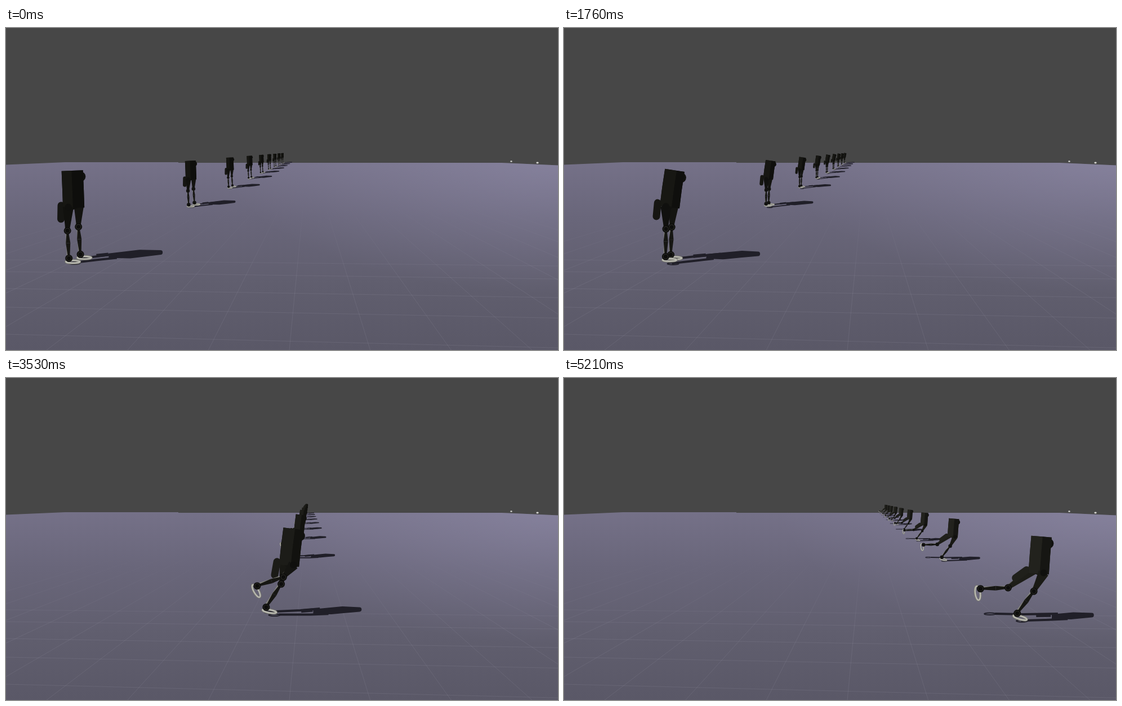
Write an HTML page with a canvas that moves like this. It is 980 px wide and 571 px high and loops after 5.28 s.

```html
<!DOCTYPE html>
<html lang="en">
<head>
<meta charset="utf-8">
<title>Walking robots</title>
<style>
html, body { margin: 0; width: 100%; height: 100%; overflow: hidden; background: #474747; }
canvas { display: block; }
</style>
</head>
<body>
<canvas id="stage" width="980" height="571"></canvas>
<script>
const ctx = document.getElementById('stage').getContext('2d');
const W = 980, H = 571, LOOP = 5280, HOLD = 680, STEP = 76.78, ROBOTS = 9, SHIN = 49;
const VP = [537, 218];

const lerp = (a, b, u) => a + (b - a) * u;
const rad = deg => deg * Math.PI / 180;
const sin = deg => Math.sin(rad(deg));
const cos = deg => Math.cos(rad(deg));
const mix = (a, b, u) => a.map((v, i) => lerp(v, b[i], u));

// Pose: step, hip x, hip y, lean, then near and far leg as
// thigh angle, thigh length as seen, shin angle. Angles in degrees, forward positive.
const stand = [0, 120, 314, -2, -2, 42, 3, -1, 42, 4];
const kick = [9, 152, 346, -92, 110, 45, 102, 9, 19, -40];
const lean = [21, 279, 306, 62, 13, 28, -23, -32, 55, -37];
const reach = [31, 388, 331, 35, 19, 25, -10, -47, 18, -51];
const push = [45, 618, 325, -23, -39, 58, -56, -32, 38, -92];
const glide = [56, 775, 324, 27, -15, 35, -39, -36, 43, -66];
const land = [60, 843, 342, 4, -28, 37, -37, -54, 57, -88];

const upright = stand.slice();
upright[0] = 14;
upright[1] += 53;

// Half a stride on, the legs have traded places.
function stride(a, b) {
  const m = mix(a, b, .5);
  return [...m.slice(0, 4), ...m.slice(7), ...m.slice(4, 7)];
}

const poses = [stand, kick, upright, lean, stride(lean, reach), reach,
  stride(reach, push), push, stride(push, glide), glide, land];

function poseAt(step) {
  const i = Math.max(1, poses.findIndex(p => p[0] >= step));
  const a = poses[i - 1], b = poses[i];
  return mix(a, b, (step - a[0]) / (b[0] - a[0]));
}

const move = ([x, y], deg, d) => [x + d * sin(deg), y - d * cos(deg)];
const hang = ([x, y], deg, d) => [x + d * sin(deg), y + d * cos(deg)];

function makeLeg(hip, thigh, length, shin) {
  const knee = hang(hip, thigh, length), ankle = hang(knee, shin, SHIN);
  // The foot stays flat until the shin swings far enough.
  const tilt = -Math.sign(shin) * Math.max(0, Math.abs(shin) - 25) * 1.3;
  const sole = [ankle[0] + 7 * cos(tilt) - 6 * sin(tilt), ankle[1] + 7 * sin(tilt) + 6 * cos(tilt)];
  return { hip, knee, ankle, sole, tilt };
}

function build([, x, y, tilt, ...legs]) {
  const spread = 11 * Math.cos(x / 220), hips = [x, y];
  const bent = tilt + 12 * sin(tilt), turn = sin(2 * tilt);
  const half = 19 - 6 * Math.max(0, turn);
  const base = move(hips, tilt, -5), mid = move(hips, tilt, 28), top = move(mid, bent, 33);
  // A column of the torso: -half is the back, half is the chest.
  const side = d => [move(base, tilt + 90, d), move(mid, (tilt + bent) / 2 + 90, d), move(top, bent + 90, d)];
  const back = side(-half), chest = side(half), edge = side(half * turn * .85);
  const pad = move(hips, tilt - 90, 22);
  return {
    x, back, chest, edge, bent,
    body: [...back, ...chest.slice().reverse()],
    near: makeLeg([x - spread, y + 3.5], ...legs.slice(0, 3)),
    far: makeLeg([x + spread, y - 3.5], ...legs.slice(3)),
    pad: [pad, hang(pad, legs[3], 24)],
    lens: move(move(mid, bent, 22), bent + 90, half * .75),
    glow: Math.max(0, -sin(tilt))
  };
}

function path(points) {
  ctx.beginPath();
  points.forEach(p => ctx.lineTo(...p));
}

function poly(points, fill) {
  path(points);
  ctx.fillStyle = fill;
  ctx.fill();
}

function line(points, width, color) {
  path(points);
  ctx.lineWidth = width;
  ctx.strokeStyle = color;
  ctx.stroke();
}

function oval([x, y], rx, ry, deg, fill, stroke, width) {
  ctx.beginPath();
  ctx.ellipse(x, y, rx, ry, rad(deg), 0, 7);
  if (fill) { ctx.fillStyle = fill; ctx.fill(); }
  if (stroke) { ctx.lineWidth = width; ctx.strokeStyle = stroke; ctx.stroke(); }
}

// Taper from p to q.
function limb(p, q, w1, w2, color) {
  const d = Math.hypot(q[0] - p[0], q[1] - p[1]) || 1;
  const nx = (p[1] - q[1]) / d / 2, ny = (q[0] - p[0]) / d / 2;
  const at = ([x, y], w) => [x + nx * w, y + ny * w];
  poly([at(p, w1), at(q, w2), at(q, -w2), at(p, -w1)], color);
}

function drawLeg({ hip, knee, ankle, sole, tilt }, shade) {
  const ry = 2.6 + 2.2 * Math.abs(sin(tilt));
  oval(sole, 12.5, ry, tilt, null, '#77776f', 4);
  oval(sole, 12.5, ry - .3, tilt, null, '#b9b9b1', 2.4);
  const lit = ([x, y]) => [x - 2, y - 2];
  line([hip, knee].map(lit), 5, '#5c5c56');
  limb(hip, knee, 19, 7, shade);
  line([knee, ankle].map(lit), 3, '#85857d');
  const calf = mix(knee, ankle, .45);
  limb(knee, calf, 3, 8, '#161613');
  limb(calf, ankle, 8, 3, '#161613');
  for (const p of [knee, ankle]) {
    oval(p, 6.5, 6.5, 0, '#0d0d0c');
    oval(p, 4.2, 4.2, 0, null, '#282823', 1.2);
  }
}

function drawShadow({ near, far, body, pad }) {
  const color = '#201f28';
  const cast = lift => ([x, y]) => {
    const ground = 411 + .02 * x + lift, h = Math.max(0, ground - y);
    return [x + (.92 - x / 2000) * h, ground - (.105 - x * .00006) * h];
  };
  for (const [leg, lift] of [[near, 4], [far, -5]]) {
    const flat = cast(lift);
    line([leg.hip, leg.knee, leg.ankle].map(flat), 4, color);
    oval(flat(leg.sole), 10, 1.8, 0, null, color, 2);
  }
  const flat = body.map(cast(0));
  poly(flat, color);
  line([...flat, flat[0]], 8, color);
  line(pad.map(cast(-2)), 6, color);
}

function drawRobot(r) {
  const tone = k => {
    const v = (20 + r.x / 60) * k;
    return `rgb(${v},${v},${v * .84})`;
  };
  drawShadow(r);
  drawLeg(r.far, tone(.85));
  ctx.lineCap = 'round';
  line(r.pad, 13, tone(.95));
  line([r.near.hip, r.far.hip], 15, tone(.7));
  ctx.lineCap = 'butt';
  oval(r.lens, 9, 9, 0, '#11110f');
  poly(r.body, tone(.85));
  poly([...r.back, ...r.edge.slice().reverse()], tone(1));
  poly([...r.edge, ...r.chest.slice().reverse()], tone(.65));
  drawLeg(r.near, tone(.75));
  oval(r.near.hip, 6, 6, 0, '#10100e');
  if (r.glow > .1) {
    oval(r.lens, 11, 8, -9, '#080909', `rgba(80,85,82,${r.glow * .7})`, 1.2);
    oval(r.lens, 7, 4.5, -9, `rgba(65,165,215,${r.glow})`);
  }
}

function drawScene() {
  ctx.fillStyle = '#474747';
  ctx.fillRect(0, 0, W, H);
  const floor = ctx.createLinearGradient(0, 237, 0, H);
  floor.addColorStop(0, '#757188');
  floor.addColorStop(.3, '#69667a');
  floor.addColorStop(.65, '#605e6e');
  floor.addColorStop(1, '#5a5867');
  poly([[0, 242.5], [105, 238], [306, 238], [306, 239], [880, 239], [W, 243.5], [W, H], [0, H]], floor);

  const light = ctx.createRadialGradient(1000, 225, 0, 1000, 225, 620);
  light.addColorStop(0, 'rgba(165,160,195,.36)');
  light.addColorStop(1, 'rgba(165,160,195,0)');
  ctx.save();
  ctx.clip();
  ctx.transform(1, 0, 0, .4, 0, 135);
  ctx.fillStyle = light;
  ctx.fillRect(0, 240, W, 900);
  ctx.restore();

  const grid = ctx.createLinearGradient(0, 310, 0, 450);
  grid.addColorStop(0, 'rgba(165,163,180,0)');
  grid.addColorStop(1, 'rgba(165,163,180,.15)');
  for (let i = -8; i <= 8; i++) line([VP, [503 + i * 143.6, H]], 1, grid);
  for (const y of [411, 432, 462, 495, 543])
    line([[0, y], [W, y + 11 + (y - 411) * .1]], 1, grid);
  oval([897, 236.5], 1.7, 1.3, 0, '#d5d5d0');
  oval([943.5, 239], 2.2, 1.4, 0, '#d5d5d0');
}

function frame(now) {
  const t = now % LOOP;
  const step = t < HOLD ? 0 : Math.min(60, Math.floor((t - HOLD) / STEP + .1) + 1);
  const robot = build(poseAt(step));
  ctx.lineJoin = 'round';
  drawScene();
  // Robot k stands k times as far away as the first.
  for (let k = ROBOTS; k > 0; k--) {
    ctx.setTransform(1 / k, 0, 0, 1 / k, VP[0] * (1 - 1 / k), VP[1] * (1 - 1 / k));
    drawRobot(robot);
  }
  ctx.setTransform(1, 0, 0, 1, 0, 0);
}

const start = performance.now();
(function tick() {
  frame(performance.now() - start);
  requestAnimationFrame(tick);
})();
</script>
</body>
</html>
```
